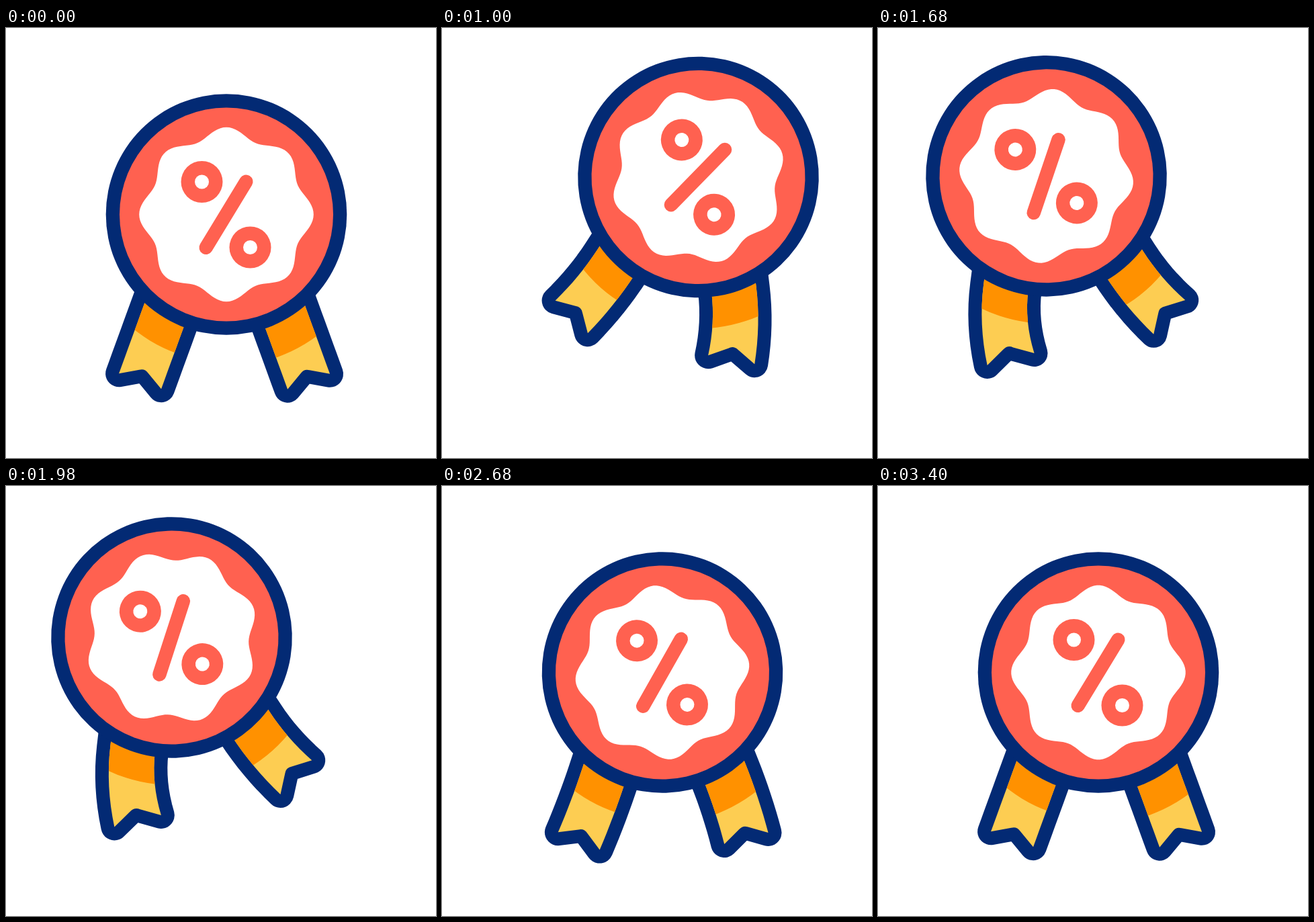
An HTML page with a canvas that plays this animation: 640x640 px, repeating every 3.6 s.

```html
<!DOCTYPE html>
<html lang="en">
<head>
<meta charset="utf-8">
<title>Discount rosette</title>
<style>
html, body { margin: 0; width: 100%; height: 100%; overflow: hidden; background: #fff; }
canvas { display: block; width: 640px; height: 640px; }
</style>
</head>
<body>
<canvas id="stage" width="640" height="640"></canvas>
<script>
const ctx = document.getElementById('stage').getContext('2d');
const NAVY = '#032a74', RED = '#ff6150', ORANGE = '#ff9100', YELLOW = '#fdcd52';
const LOOP = 3600, START = 100, SETTLE = 2480, END = 3400, RAD = Math.PI / 180;

// Key poses of the swing: rest, right, over the top, left, back to rest
const POSES = [
  { t: START, x: 328, y: 277.5, tilt: 0, bend: 0 },
  { t: 440, x: 382, y: 235, tilt: 11.9, bend: 0 },
  { t: 1000, x: 381.5, y: 222, tilt: 13, bend: 13.5 },
  { t: 1180, x: 313.5, y: 213, tilt: 0, bend: 0 },
  { t: 1360, x: 262.5, y: 216.5, tilt: -10.5, bend: -17 },
  { t: 1980, x: 246.5, y: 225.5, tilt: -13.3, bend: -16 },
  { t: 2260, x: 302, y: 272, tilt: 0, bend: -6 },
  { t: SETTLE, x: 328, y: 277.5, tilt: 5, bend: 3.5 }
];

const clamp = v => Math.min(1, Math.max(0, v));

// Monotone cubic interpolation: smooth, without overshoot between poses
function secant(i, key) {
  const a = POSES[i], b = POSES[i + 1];
  return a && b ? (b[key] - a[key]) / (b.t - a.t) : 0;
}
function slope(i, key) {
  const a = secant(i - 1, key), b = secant(i, key);
  return a * b > 0 ? 2 * a * b / (a + b) : 0;
}
function poseValue(t, key) {
  let i = 0;
  while (i < POSES.length - 2 && t > POSES[i + 1].t) i++;
  const a = POSES[i], b = POSES[i + 1], span = b.t - a.t;
  const u = clamp((t - a.t) / span), v = 1 - u;
  return a[key] * (1 + 2 * u) * v * v + b[key] * (3 - 2 * u) * u * u
    + span * (slope(i, key) * u * v * v - slope(i + 1, key) * u * u * v);
}

// Fading oscillation after the swing
function wobble(t, size, delay) {
  return size * clamp((END - t) / (END - SETTLE)) * Math.cos(Math.PI * (t - SETTLE - delay) / 310);
}

function disc(x, y, r, color) {
  ctx.beginPath();
  ctx.arc(x, y, r, 0, 2 * Math.PI);
  ctx.fillStyle = color;
  ctx.fill();
}

function ribbon(tilt, middle, length, shift, bend, shade) {
  const half = 33.5, top = 120, steps = 12;
  // Point across (u) and along (s) the curved ribbon
  const at = (u, s) => {
    const q = Math.max(0, (s - 172) / 103);
    return [middle + u + shift - bend * q * q, s + u * 2 * bend * q / 103];
  };
  const path = new Path2D();
  for (let i = 0; i <= steps; i++) path.lineTo(...at(-half, top + (length - top) * i / steps));
  path.lineTo(...at(-7, length - 15.5));
  path.quadraticCurveTo(...at(0, length - 20.5), ...at(7, length - 15.5));
  for (let i = steps; i >= 0; i--) path.lineTo(...at(half, top + (length - top) * i / steps));
  path.closePath();

  ctx.save();
  ctx.rotate(tilt * RAD);
  ctx.lineWidth = 40;
  ctx.lineJoin = 'round';
  ctx.strokeStyle = NAVY;
  ctx.stroke(path);
  ctx.fillStyle = YELLOW;
  ctx.fill(path);
  ctx.clip(path);
  disc(0, 0, shade, ORANGE);
  ctx.restore();
}

function seal(angle) {
  ctx.beginPath();
  for (let a = 0; a < 360; a += 2) {
    const r = 122.3 + 7.5 * Math.cos(8 * a * RAD);
    ctx.lineTo(r * Math.cos((a + angle) * RAD), r * Math.sin((a + angle) * RAD));
  }
  ctx.closePath();
  ctx.fillStyle = '#fff';
  ctx.fill();
}

function ring(x, y) {
  disc(x, y, 31, RED);
  disc(x, y, 10.5, '#fff');
}

function percent() {
  ring(-36.5, -48.5);
  ring(35.5, 49);
  ctx.beginPath();
  ctx.moveTo(-30.3, 49.3);
  ctx.lineTo(29.3, -48.8);
  ctx.lineWidth = 20.5;
  ctx.lineCap = 'round';
  ctx.strokeStyle = RED;
  ctx.stroke();
}

function draw(t) {
  const settling = t > SETTLE;
  const tilt = settling ? wobble(t, 5, 0) : poseValue(t, 'tilt');
  const bend = settling ? wobble(t, 10, 120) : poseValue(t, 'bend');
  const shift = 0.15 * bend, squeeze = 0.2 * Math.abs(bend);

  ctx.clearRect(0, 0, 640, 640);
  ctx.save();
  ctx.translate(poseValue(t, 'x'), poseValue(t, 'y'));
  ctx.rotate(tilt * RAD);
  ribbon(20, -35.8, 277.2, shift, bend - squeeze, 219.5);
  ribbon(-20, 30.1, 275.7, shift, bend + squeeze, 225.5);
  disc(0, 0, 179.3, NAVY);
  disc(0, 0, 159, RED);
  seal(225 * clamp((t - START) / (END - START)));
  percent();
  ctx.restore();
}

function tick() {
  draw(performance.now() % LOOP);
  requestAnimationFrame(tick);
}
tick();
</script>
</body>
</html>
```
